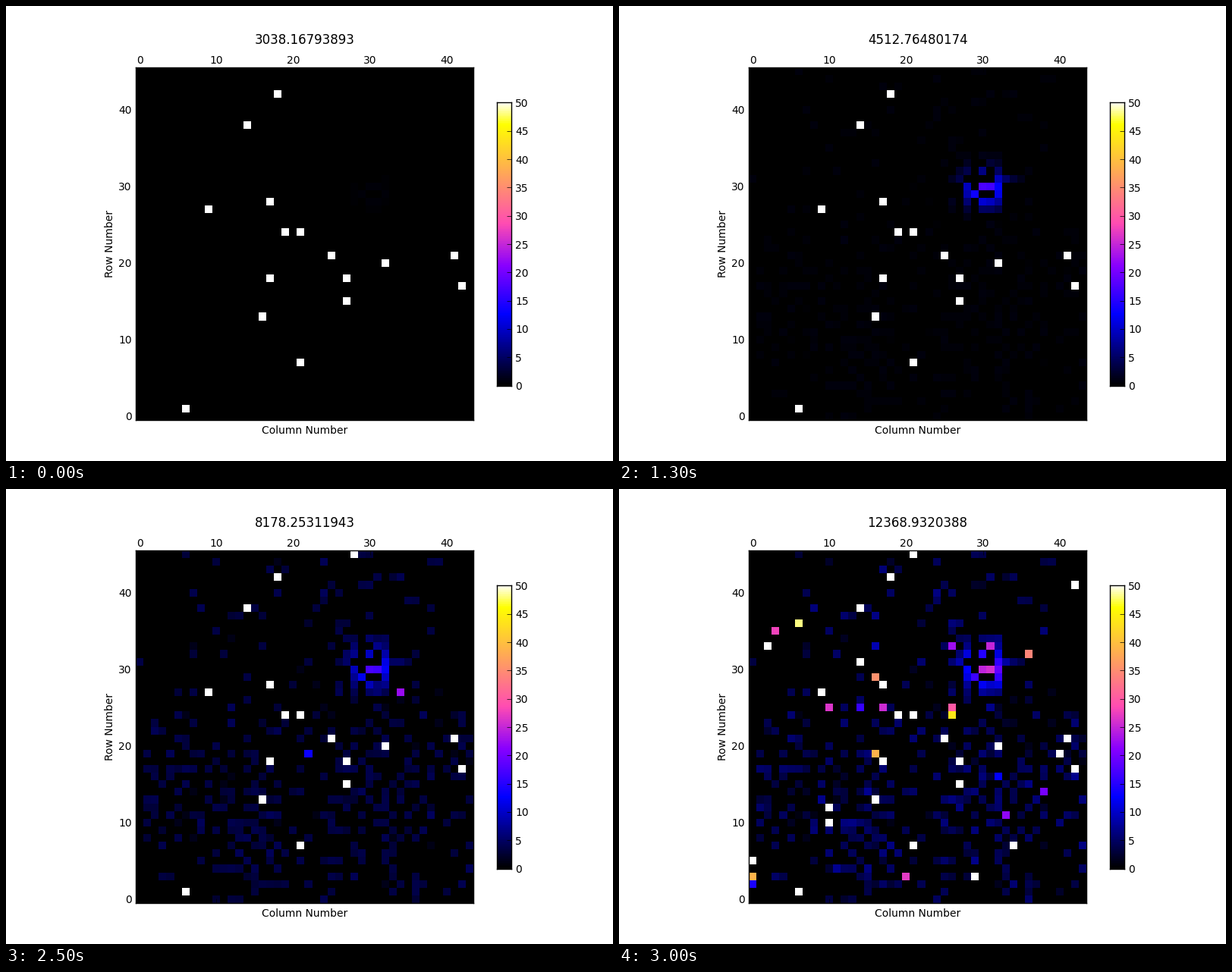
Write a matplotlib script that moves like this. It is 800 px wide and 600 px high and loops after 3100 ms.

```python
import numpy as np
import matplotlib.pyplot as plt
from matplotlib.animation import FuncAnimation

W, H, DPI = 800, 600, 100
COLS, ROWS, FRAMES = 44, 46, 31
FULL = 50

plt.rcParams.update({
    "font.family": "DejaVu Sans", "font.size": 10,
    "axes.linewidth": 1.0, "axes.facecolor": "black",
    "xtick.direction": "in", "ytick.direction": "in",
    "xtick.major.size": 4, "ytick.major.size": 4,
    "xtick.major.width": 0.5, "ytick.major.width": 0.5,
    "xtick.major.pad": 1.7, "ytick.major.pad": 4,
})

# Always saturated pixels: (column, row)
HOT = [(18, 42), (14, 38), (17, 28), (9, 27), (19, 24), (21, 24), (25, 21),
       (32, 20), (41, 21), (42, 17), (17, 18), (27, 18), (27, 15), (16, 13),
       (21, 7), (6, 1)]

col, row = np.meshgrid(np.arange(COLS), np.arange(ROWS))


def bump(x, y, sx, sy):
    return np.exp(-(((col - x) / sx) ** 2 + ((row - y) / sy) ** 2) / 2)


def spot_mask():
    """Live pixels of the spot: two sides, a broken core and an arm."""
    sides = (col == 28) | (col == 32)
    core = (col >= 30) & (col <= 31) & (row != 29) & (row + col != 63)
    notch = (col == 29) & (row == 29)
    arm = (col >= 32) & (col <= 35)
    return np.where(row == 31, arm, sides | core | notch)


def live_mask(rng):
    density = (0.06 + 0.55 * bump(14, 8, 2.8, 7) + 0.32 * bump(5, 14, 3.5, 5)
               + 0.22 * bump(29, 33, 4, 9) + 0.3 * bump(30, 13, 6, 8)
               + 0.22 * bump(40, 17, 4, 4))
    live = rng.random((ROWS, COLS)) < density
    box = (col >= 28) & (col <= 35) & (row >= 27) & (row <= 34)
    return np.where(box, spot_mask(), live)


rng = np.random.default_rng(12)
live = live_mask(rng)
gain = rng.normal(1, 0.1, live.shape)
gain[rng.random(live.shape) < 0.06] = 0.35


def background(n):
    """Slow quadratic rise with a surge near the end."""
    return 0.0033 * n ** 2 + 4.4 * np.exp(-((n - 27.5) / 2.2) ** 2)


def spot(n):
    """A glow that drifts upwards and tightens while its strength varies."""
    strength = np.interp(n, [0, 9, 17, 23, 27, 30], [0.6, 14, 21, 15, 15, 24])
    y = np.interp(n, [9, 17], [29.1, 30.3])
    sx = np.interp(n, [9, 17], [2.2, 1.7])
    return strength * bump(30.3, y, sx, 1.6)


def counts(n):
    rng = np.random.default_rng(100 + n)
    spread = np.interp(n, [27, 30], [0.08, 0.25])
    noise = background(n) * gain * rng.normal(1, spread, gain.shape)
    data = np.where(live, noise + spot(n), 0)

    # Short flashes, ever more of them towards the end
    for _ in range(int(28 * np.exp((n - 30) / 2.5))):
        r, c = rng.integers(ROWS), rng.integers(COLS)
        data[r, c] = 12 + rng.exponential(30)
    for c, r in HOT:
        data[r, c] = FULL
    return np.clip(data, 0, FULL)


def energy(n):
    """Middle of the n-th bin between edges that go as 1 / (40.3 - n)."""
    return 60450 * (1 / (39.3 - n) + 1 / (40.3 - n))


fig = plt.figure(figsize=(W / DPI, H / DPI), dpi=DPI, facecolor="white")
scale = dict(cmap="gnuplot2", vmin=0, vmax=FULL, origin="lower",
             interpolation="nearest", aspect="auto")

height = 465
width = height * COLS / ROWS
ax = fig.add_axes([(616 - width) / W, 54 / H, width / W, height / H])
image = ax.imshow(counts(0), **scale)
ax.set_xticks(range(0, COLS, 10))
ax.set_yticks(range(0, ROWS, 10))
ax.tick_params(top=True, bottom=True, left=True, right=True,
               labeltop=True, labelbottom=False)
ax.xaxis.set_label_position("bottom")
ax.set_xlabel("Column Number", labelpad=5)
ax.set_ylabel("Row Number", labelpad=2.7)
title = ax.set_title("", fontsize=12, y=1.05, pad=5.5)

bar = fig.add_axes([647 / W, 99.5 / H, 18.6 / W, 373 / H])
bar.imshow(np.linspace(0, FULL, 256)[:, None], extent=(0, 1, 0, FULL), **scale)
bar.set_xticks([])
bar.yaxis.tick_right()
bar.set_yticks(range(0, FULL + 1, 5))


def update(n):
    image.set_data(counts(n))
    title.set_text(f"{energy(n):.12g}")
    return image, title


anim = FuncAnimation(fig, update, frames=FRAMES, interval=100, repeat=True,
                     repeat_delay=0, blit=False)
plt.show()
```
